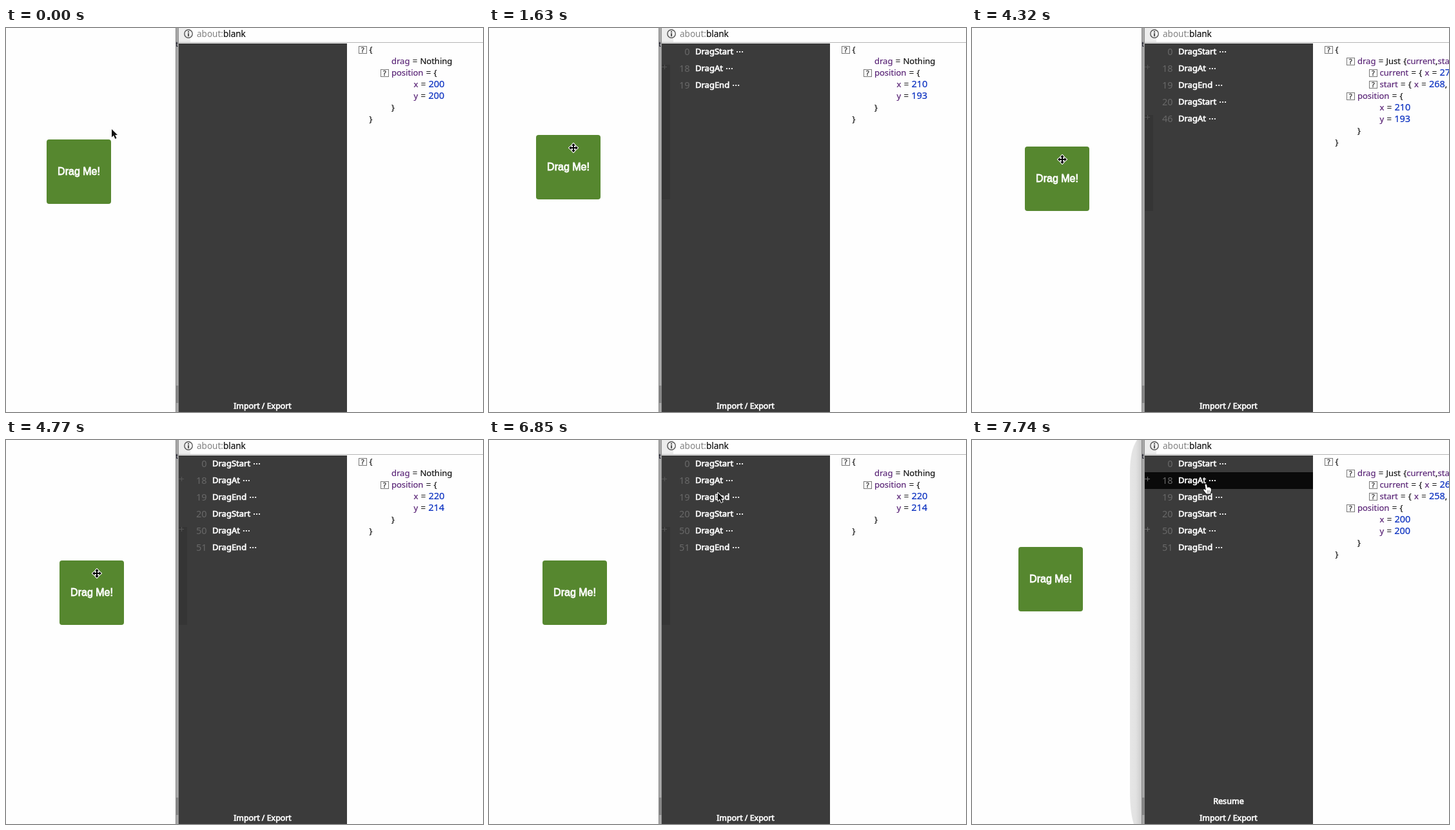
An HTML page with a canvas that plays this animation: 740 by 596 pixels, repeating every 8 s.

```html
<!DOCTYPE html>
<html lang="en">
<head>
<meta charset="utf-8">
<title>Drag history</title>
<style>
html, body { margin: 0; width: 100%; height: 100%; overflow: hidden; background: #fefefe; }
canvas { display: block; }
</style>
</head>
<body>
<canvas id="stage" width="740" height="596"></canvas>
<script>
const ctx = document.getElementById('stage').getContext('2d');
const LOOP = 8000;
const TICK = 149; // the screen refreshes in steps of this many ms
const SANS = '"Noto Sans", "Open Sans", sans-serif';
const UI_SANS = '"Liberation Sans", sans-serif';
const ROW = 26;

// Moments in ticks
const PRESS = 48;
const REWIND = 52;
const REWIND_TO = 8.25;

const linear = p => p;
const easeIn = p => p * p;
const easeInOut = p => p < 0.5 ? 4 * p ** 3 : 1 - 4 * (1 - p) ** 3;

// Each move adds its own offset to the pointer; drags also carry the box.
const moves = [
  { from: 2, to: 5, dx: -42, dy: 37, ease: easeInOut },
  { from: 38, to: 41, dx: 159, dy: 26, ease: easeIn },
  { from: 41, to: 42, dx: 52, dy: -83, ease: linear },
  { from: 42, to: 43, dx: -7, dy: -52, ease: linear },
  { from: 43, to: 47, dx: 16, dy: -31, ease: easeIn }
];
const drags = [
  { down: 6, from: 6.6, to: 8.8, up: 11, dx: 10, dy: -7, events: 18, ease: easeInOut },
  { down: 26, from: 27, to: 30, up: 32, dx: 10, dy: 21, events: 30, ease: easeInOut }
];

const progress = (m, k) =>
  m.ease(Math.min(1, Math.max(0, (k - m.from) / (m.to - m.from))));

function travel(list, k, x, y) {
  for (const m of list) {
    const p = progress(m, k);
    x += m.dx * p;
    y += m.dy * p;
  }
  return { x: Math.round(x), y: Math.round(y) };
}

const pointerAt = k => travel([...moves, ...drags], k, 163, 156);
const boxAt = k => travel(drags, k, 63, 173);

function modelAt(k) {
  const done = drags.filter(d => d.up <= k);
  const active = drags.find(d => d.down <= k && k < d.up);
  const model = travel(done, k, 200, 200);
  if (active) {
    model.start = pointerAt(active.down).x + 137;
    model.current = pointerAt(k).x + 137;
  }
  return model;
}

function historyAt(k) {
  const rows = [];
  let n = 0;
  for (const d of drags) {
    const p = progress(d, k);
    if (k >= d.down) rows.push({ label: 'DragStart', n });
    if (p > 0.1) rows.push({ label: 'DragAt', n: n + Math.round(d.events * p) });
    n += d.events + 1;
    if (k >= d.up) rows.push({ label: 'DragEnd', n });
    n++;
  }
  return rows;
}

function rect(x, y, w, h, color) {
  ctx.fillStyle = color;
  ctx.fillRect(x, y, w, h);
}

function text(str, x, y, size, color, { align = 'left', family = SANS, weight = 0 } = {}) {
  ctx.font = `${size}px ${family}`;
  ctx.textAlign = align;
  ctx.fillStyle = ctx.strokeStyle = color;
  ctx.fillText(str, x, y);
  if (weight) {
    ctx.lineWidth = weight;
    ctx.strokeText(str, x, y);
  }
  return ctx.measureText(str).width;
}

function shape(points, fill, line, width) {
  ctx.beginPath();
  points.forEach(([x, y]) => ctx.lineTo(x, y));
  ctx.closePath();
  ctx.lineJoin = 'round';
  ctx.lineWidth = width;
  ctx.strokeStyle = line;
  ctx.stroke();
  ctx.fillStyle = fill;
  ctx.fill();
}

const pointers = {
  arrow() {
    shape([[1, 1], [1, 13.5], [4, 10.8], [6.3, 16], [8.5, 15], [6.2, 10], [10, 10]],
      '#111', '#fff', 1.8);
  },
  move() {
    const arm = [[1, -1], [1, -3.5], [3, -3.5], [0, -7], [-3, -3.5], [-1, -3.5]];
    const turn = ([x, y], n) => n ? turn([-y, x], n - 1) : [x, y];
    shape([0, 3, 2, 1].flatMap(n => arm.map(p => turn(p, n))), '#000', '#fff', 2);
  },
  hand() {
    ctx.translate(3, 1);
    shape([[-2.5, 1], [-1, 0.5], [0, 1.5], [1, 6], [3.6, 5.2], [6.5, 7], [7, 10],
      [5.5, 15.5], [-0.5, 15.5], [-5, 9.5], [-4, 8], [-1.2, 10]], '#fff', '#111', 1.4);
    rect(1.3, 10, 0.8, 4, '#555');
    rect(3.5, 10, 0.8, 4, '#555');
  }
};

function drawShadow() {
  const shade = ctx.createLinearGradient(245, 0, 263, 0);
  shade.addColorStop(0, '#e6e6e6');
  shade.addColorStop(0.5, '#e2e2e2');
  shade.addColorStop(1, '#cdcdcd');
  ctx.fillStyle = shade;
  ctx.beginPath();
  ctx.moveTo(256, 0);
  ctx.quadraticCurveTo(245, 16, 245, 50);
  ctx.lineTo(245, 545);
  ctx.quadraticCurveTo(245, 578, 251, 596);
  ctx.lineTo(264, 596);
  ctx.lineTo(264, 0);
  ctx.fill();
}

function drawWindow(k) {
  if (k >= PRESS) drawShadow();
  rect(263, 0, 5, 596, '#a9a9a9');
  rect(263, 0, 1, 596, '#858585');
  rect(267, 0, 1, 596, '#929292');
  rect(263, 555, 5, 27, '#858585');
  text('t', 263.5, 29, 11, '#001', { family: UI_SANS });

  rect(268, 0, 472, 596, '#fefefe');
  rect(268, 0, 18, 22, '#ededed');
  rect(268, 22, 472, 1, '#b5b5b5');
  ctx.beginPath();
  ctx.arc(283, 9, 6.2, 0, Math.PI * 2);
  ctx.lineWidth = 1.4;
  ctx.strokeStyle = '#555';
  ctx.stroke();
  rect(282, 5, 2, 2, '#555');
  rect(282, 8, 2, 5, '#555');
  const w = text('about:', 296, 14, 13.5, '#808080');
  text('blank', 296 + w, 14, 13.5, '#111', { weight: 0.2 });
}

function drawHistory(k) {
  const rows = historyAt(k);
  const bold = { weight: 0.7 };
  const centered = { align: 'center', weight: 0.7 };
  rect(268, 24, 261, 572, '#3b3b3b');

  // Faint strip beside the newest DragAt, down to the bottom of the box
  const last = rows.map(r => r.label).lastIndexOf('DragAt');
  if (last > 0 && k < PRESS) {
    const top = 31 + ROW * last;
    rect(268, top, 13, boxAt(k).y + 100 - top, '#353535');
  }

  rows.forEach(({ label, n }, i) => {
    const y = 37 + ROW * i;
    if (k >= REWIND && i === 1) rect(268, y - 13, 261, ROW, '#0a0a0a');
    if (label === 'DragAt') {
      const tone = k >= PRESS ? '#707070' : '#555';
      rect(268, y - 3, 8, 1, tone);
      rect(272, y - 6, 1, 7, tone);
    }
    text(n, 311.5, y + 5, 14.5, '#686868', { align: 'right' });
    const end = 325 + text(label, 320, y + 4, 13, '#fff', bold);
    for (let d = 0; d < 3; d++) rect(end + 4 * d, y - 1, 2, 2, '#eee');
  });

  if (k >= REWIND) text('Resume', 398, 565, 12.6, '#fff', centered);
  text('Import / Export', 398, 591, 12.4, '#fff', centered);
}

function drawLine(str, row) {
  const depth = str.match(/^\t*/)[0].length;
  const y = 34 + 18 * row;
  let x = 563.5 + 34.5 * depth;
  if (str.includes('{')) {
    const left = Math.round(x) - 17;
    ctx.lineWidth = 1;
    ctx.strokeStyle = '#777';
    ctx.strokeRect(left + 0.5, y - 5.5, 12, 11);
    text('?', left + 6.5, y + 4, 10, '#444', { align: 'center', weight: 0.5 });
  }
  for (const part of str.trim().match(/\w+|\s|[^\w\s]/g)) {
    if (part === ' ') { x += 4.3; continue; }
    const number = /\d/.test(part);
    const color = number ? '#0a30c0' : /^[a-z]/.test(part) ? '#5a2577' : '#111';
    x += text(part, x, y + 4, number ? 14.5 : 13, color, { weight: 0.2 });
  }
}

function drawModel(k) {
  const { x, y, start, current } = modelAt(k);
  const drag = start
    ? ['\tdrag = Just {current,start}',
      `\t\tcurrent = { x = ${current}, y = ${y} }`,
      `\t\tstart = { x = ${start}, y = ${y} }`]
    : ['\tdrag = Nothing'];
  ['{', ...drag, '\tposition = {', `\t\tx = ${x}`, `\t\ty = ${y}`, '\t}', '}'].forEach(drawLine);
}

function drawBox({ x, y }) {
  ctx.fillStyle = '#56872f';
  ctx.beginPath();
  ctx.roundRect(x, y, 100, 100, 4);
  ctx.fill();
  text('Drag Me!', x + 50, y + 55, 16, '#fff',
    { align: 'center', family: UI_SANS, weight: 0.8 });
}

function drawPointer(k, box) {
  const { x, y } = pointerAt(k);
  const over = x > box.x && x < box.x + 100 && y > box.y && y < box.y + 100;
  ctx.save();
  ctx.translate(x, y);
  pointers[k >= REWIND ? 'hand' : over ? 'move' : 'arrow']();
  ctx.restore();
}

function draw(t) {
  const k = Math.floor((t + 12) / TICK);
  const seen = k >= REWIND ? REWIND_TO : k;
  const box = boxAt(seen);
  rect(0, 0, 740, 596, '#fefefe');
  drawBox(box);
  drawWindow(k);
  drawHistory(k);
  drawModel(seen);
  drawPointer(k, box);
}

const begin = performance.now();
function tick() {
  draw((performance.now() - begin) % LOOP);
  requestAnimationFrame(tick);
}
tick();
</script>
</body>
</html>
```
